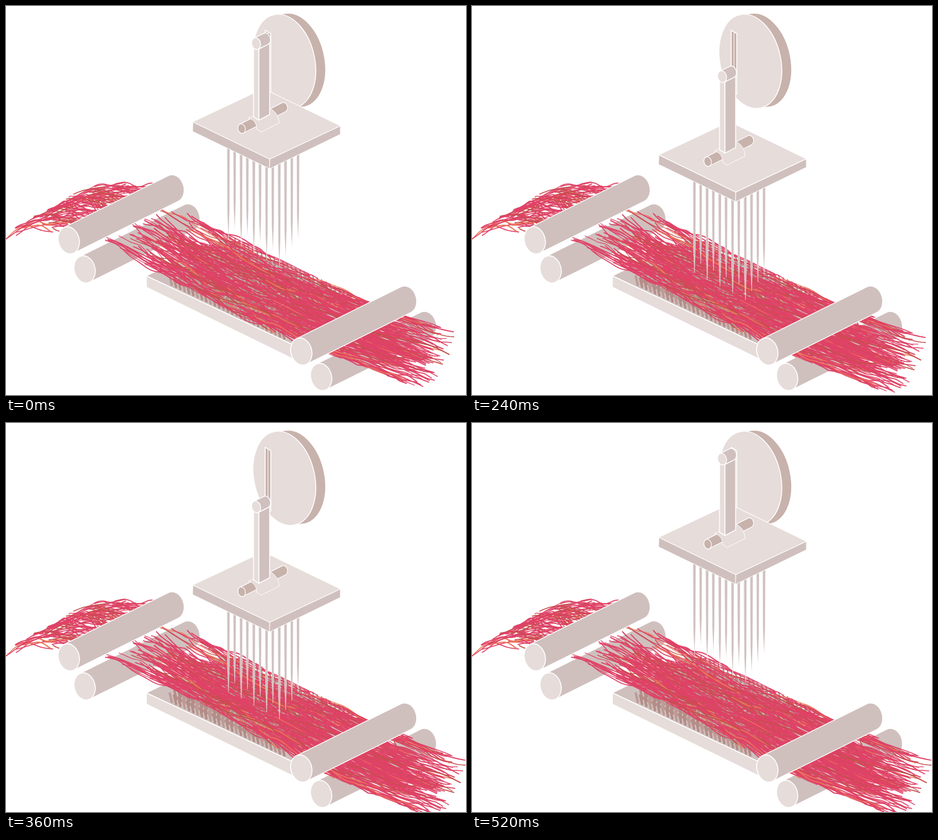
Recreate the animation shown at these times as an HTML page with a canvas. Size 813 by 689 pixels, loop 720 ms.

```html
<!DOCTYPE html>
<html lang="en">
<head>
<meta charset="utf-8">
<title>Needle loom</title>
<style>
html, body { margin: 0; height: 100%; overflow: hidden; background: #fff; }
canvas { display: block; }
</style>
</head>
<body>
<canvas id="stage" width="813" height="689"></canvas>
<script>
const ctx = document.getElementById('stage').getContext('2d');
const LIGHT = '#e6dcda', MID = '#cfc0be', DARK = '#c8b2ac';
const TAU = Math.PI * 2;

let seed = 7;
const rand = (lo = 0, hi = 1) => {
  seed = (seed * 16807) % 2147483647;
  return lo + (hi - lo) * seed / 2147483647;
};
const mix = (a, b, k) => a + (b - a) * k;
const clamp = (v, lo, hi) => Math.max(lo, Math.min(hi, v));
const repeat = (n, make) => Array.from({ length: n }, (_, i) => make(i));

function paint(fill, line = 1.6) {
  ctx.fillStyle = fill;
  ctx.fill();
  if (!line) return;
  ctx.strokeStyle = '#fff';
  ctx.lineWidth = line;
  ctx.stroke();
}

function poly(fill, points, line) {
  ctx.beginPath();
  points.forEach(([x, y]) => ctx.lineTo(x, y));
  ctx.closePath();
  paint(fill, line);
}

// Solid swept by a tilted ellipse from (x1, y1), its open cap, to (x2, y2)
function cylinder(x1, y1, x2, y2, rx, ry, tilt, body, cap, line = 1.6) {
  const dx = x2 - x1, dy = y2 - y1, c = Math.cos(tilt), s = Math.sin(tilt);
  const a = Math.atan2(-(dx * c + dy * s) / rx, (dy * c - dx * s) / ry);
  ctx.beginPath();
  ctx.ellipse(x2, y2, rx, ry, tilt, a, a + Math.PI);
  ctx.ellipse(x1, y1, rx, ry, tilt, a + Math.PI, a + TAU);
  ctx.closePath();
  paint(body, line);
  ctx.beginPath();
  ctx.ellipse(x1, y1, rx, ry, tilt, 0, TAU);
  paint(cap, line);
}

const roller = (x, y) => cylinder(x, y, x + 185, y - 92, 18.4, 24.4, -0.25, MID, LIGHT);

// Ribbons map u (px along the feed) and v (-1 to 1 across it) to the stage
const tail = (u, v) => [172 + u + 72 * v, 358 - .12 * u - 40 * v + 12 * Math.sin(u / 35)];
function mat(u, v, feed) {
  const press = v < 0 ? 1 - .012 * feed * Math.max(0, Math.sin(u / 110)) : 1;
  const shift = feed * clamp((u - 300) / 150, 0, 1);
  return [
    236 + u + shift + 64 * v * press,
    383 + .465 * u + 16 * Math.sin(Math.PI * u / 504) + shift - 33 * v * press
  ];
}

function fibre(place, v, u0, u1, wave, drift) {
  const hue = rand();
  return {
    place, u0, u1, v0: v, v1: clamp(v + rand(-drift, drift), -1.05, 1),
    amp: rand(.3, 1) * wave, freq: rand(.03, .09), phase: rand(0, TAU),
    width: rand(1.2, 2.1),
    color: hue < .76 ? '#df4266' : hue < .94 ? '#c4504b' : '#ee7657'
  };
}

const across = () => rand(-1, .95);
const fibres = [
  ...repeat(125, () => {
    const v = across(), u = rand(-118, -10);
    return fibre(tail, v, u, Math.min(30, u + rand(40, 110)), 7, .4);
  }),
  ...repeat(300, i => {
    const u = i % 3 ? rand(50, 300) : rand(-5, 80);
    return fibre(mat, across(), u, u + rand(70, 190), 5, .5);
  }),
  ...repeat(165, () => {
    const v = across();
    return fibre(mat, v, rand(240, 400), rand(440, 535) - 50 * v, 4, .3);
  })
];

function drawFibre(f, feed) {
  ctx.beginPath();
  for (let i = 0; i <= 22; i++) {
    const k = i / 22, u = mix(f.u0, f.u1, k);
    const [x, y] = f.place(u, mix(f.v0, f.v1, k), feed);
    const angle = u * f.freq + f.phase;
    ctx.lineTo(x, y + f.amp * (Math.sin(angle) + .3 * Math.sin(angle * 2.3)));
  }
  ctx.strokeStyle = f.color;
  ctx.lineWidth = f.width;
  ctx.stroke();
}

function drawBed() {
  poly(MID, [[248, 478], [385, 411], [644, 534], [507, 600]]);
  poly(LIGHT, [[248, 478], [507, 600], [520, 630], [505, 624], [248, 498]]);
  for (let row = 14; row >= 0; row--) {
    for (let col = 0; col <= 26; col++) {
      const x = 293 + 115 * row / 14 + 199 * col / 26;
      const y = 494 - 67 * row / 14 + 95 * col / 26;
      ctx.beginPath();
      ctx.moveTo(x, y);
      ctx.lineTo(x - 3.5, y - 15);
      ctx.strokeStyle = (row + col) % 3 ? '#b48d87' : '#bd9b96';
      ctx.lineWidth = mix(4.2, 2.4, row / 14);
      ctx.stroke();
    }
  }
}

function drawWheel() {
  cylinder(492, 98, 509.5, 96, 53.6, 84.6, -0.22, DARK, LIGHT);
  poly(DARK, [[458, 43], [468, 49], [468, 156], [458, 150]]);
  ctx.fillStyle = '#fff';
  ctx.fillRect(462.5, 47, 1, 105);
}

// Four rows of five needles, back row first; the tips stop inside the mat
function drawNeedles(sunk) {
  for (let i = 0; i < 20; i++) {
    const row = 3 - Math.floor(i / 5), col = i % 5;
    const x = 393 + 22.5 * col + 11 * row;
    const tip = 414 + 12 * col - 16 * row - sunk;
    poly(MID, [[x - 2.4, 235], [x + 2.6, 235], [x + 2, tip - 50], [x + .3, tip], [x - 1.8, tip - 45]], .4);
  }
}

function drawHead(y) {
  ctx.save();
  ctx.translate(0, y);
  drawNeedles(Math.max(0, y - 62));
  poly(MID, [[330, 205], [466, 271], [466, 288], [330, 222]], 1);
  poly(MID, [[466, 271], [591, 212], [591, 227], [466, 288]], 1);
  poly(LIGHT, [[330, 205], [455, 146], [591, 212], [466, 271]], 1.2);
  cylinder(416.5, 217, 491, 179, 6.5, 8.5, -0.25, DARK, DARK, 1.2);
  ctx.beginPath();
  ctx.moveTo(429, 198);
  ctx.lineTo(465, 181);
  ctx.quadraticCurveTo(481, 187, 483, 207);
  ctx.lineTo(451, 223);
  ctx.lineTo(443, 218);
  ctx.quadraticCurveTo(444, 203, 429, 198);
  ctx.closePath();
  paint(LIGHT, 1);
  poly(LIGHT, [[437.5, 72], [447, 76], [447, 202], [437.5, 196]]);
  poly(MID, [[447, 76], [466, 66], [466, 192], [447, 202]]);
  cylinder(442, 66.5, 459.5, 58, 7.8, 10.5, -0.25, MID, LIGHT, 1.4);
  ctx.restore();
}

function draw(step) {
  const settle = step < 3 ? 2.7 : 0;
  const drop = 44.2 - 46.7 * Math.cos(step / 10 * TAU) + settle;
  const feed = step === 1 ? 1 : clamp(5 * (step - 1), 0, 20);
  ctx.fillStyle = '#fff';
  ctx.fillRect(0, 0, 813, 689);
  ctx.lineCap = ctx.lineJoin = 'round';
  roller(139, 466.5);
  roller(557, 657);
  drawBed();
  fibres.forEach(f => drawFibre(f, feed));
  roller(111, 415);
  roller(522, 612);
  drawWheel();
  drawHead(drop);
}

function tick() {
  const t = performance.now() % 720;
  draw(clamp(Math.floor((t - 120) / 40), 0, 10));
  requestAnimationFrame(tick);
}
tick();
</script>
</body>
</html>
```
